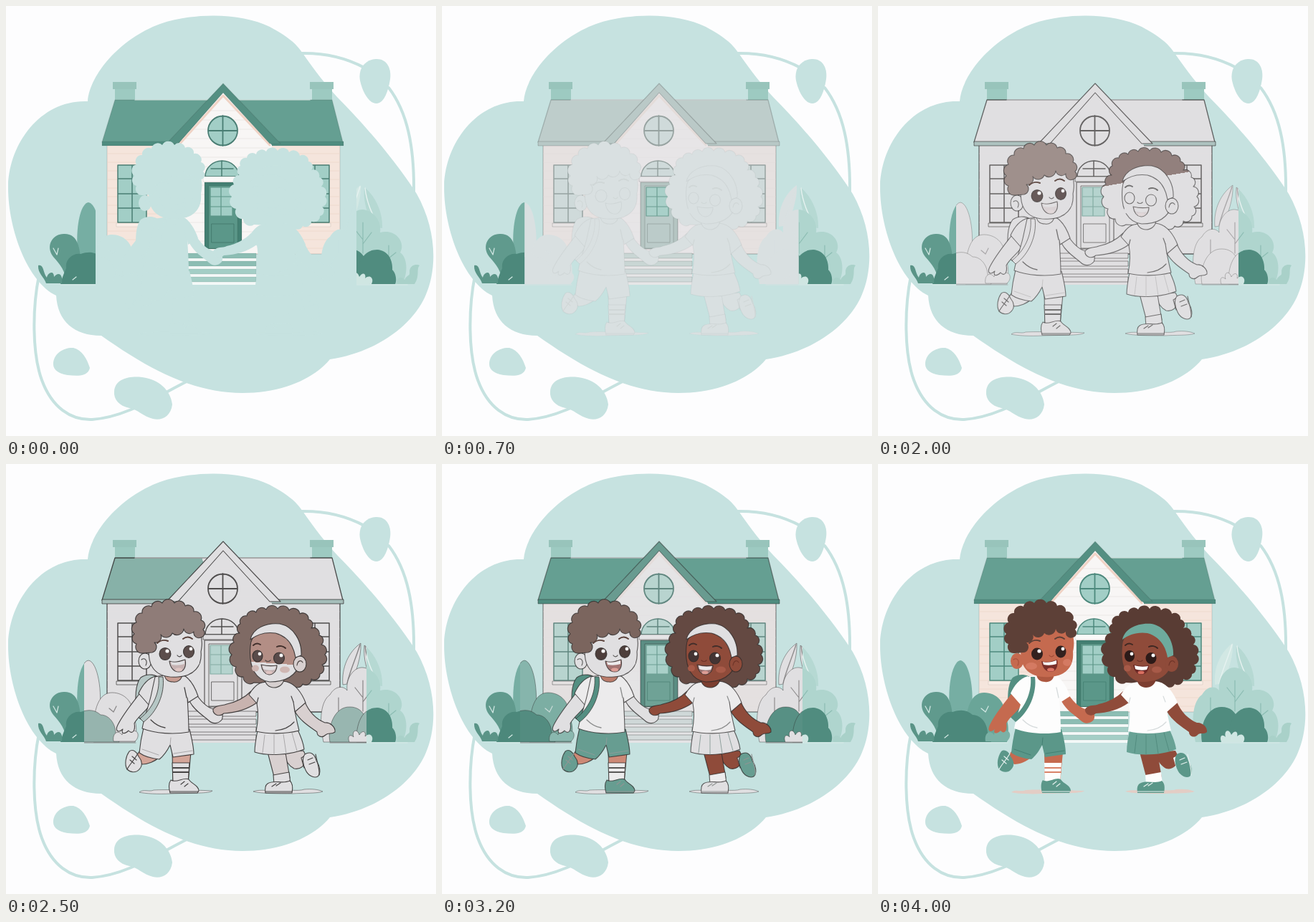
An HTML page for the animation above (7 s loop, 600x600 px).

```html
<!DOCTYPE html>
<html lang="en">
<head>
<meta charset="utf-8">
<title>Children in front of a house</title>
<style>
html, body { margin: 0; width: 100%; height: 100%; overflow: hidden; background: #fdfdfe; }
svg { display: block; width: 100vw; height: 100vh; }
</style>
</head>
<body>
<svg id="stage" viewBox="0 0 600 600"></svg>
<script>
const LOOP = 7000, STEP = 100, LAST = 4000;
const BLOB = '#c6e2e0', GREY = '#e0dfe1', INK = '#2b2928', WHITE = '#fdfdfd';
const TEAL = '#5b9789', DEEP = '#437f72', GLASS = '#a2cec6';
const stage = document.getElementById('stage');
const parts = [];

function el(tag, attrs, parent = stage) {
  const node = document.createElementNS('http://www.w3.org/2000/svg', tag);
  for (const key in attrs) node.setAttribute(key, attrs[key]);
  parent.appendChild(node);
  return node;
}

// keys: time, value, time, value ...
function at(t, keys) {
  if (t <= keys[0]) return keys[1];
  for (let i = 2; i < keys.length; i += 2) {
    if (t <= keys[i]) {
      const k = (t - keys[i - 2]) / (keys[i] - keys[i - 2]);
      return keys[i - 1] + (keys[i + 1] - keys[i - 1]) * k;
    }
  }
  return keys[keys.length - 1];
}

const rgb = hex => [1, 3, 5].map(i => parseInt(hex.slice(i, i + 2), 16));
const mix = (a, b, k) => a.map((v, i) => v + (b[i] - v) * k);
const css = c => `rgb(${c.map(Math.round)})`;

// Stages: wash to grey, ink lines, then colour (tone).
const WASH = [100, 0, 400, .45, 1000, 1];
const HOUSE_INK = [0, .12, 400, .15, 1200, .36, 2000, .68, 2500, .8, 3200, .5, 4000, .12];
const KID_INK = [600, 0, 1200, .3, 2000, .6, 2500, .85, 3200, .75, 3500, .5, 4000, 0];
const FOLD_INK = [1500, 0, 2500, .3, 3200, .3, 4000, 0];
const BUSH_INK = [1300, 0, 2000, .3, 2500, .5, 3200, .45, 4000, 0];
const NO_INK = [0, 0];
const house = (tone, more) => ({ own: true, wash: WASH, ink: HOUSE_INK, tone, ...more });
const kid = (tone, more) => ({ wash: WASH, ink: KID_INK, tone, ...more });
const bush = tone => ({ wash: WASH, ink: BUSH_INK, tone });

const K = {
  roof: house([2000, 0, 2500, .72, 3200, 1], { wipe: [2100, 0, 2500, .42, 2900, 1], dir: [134, 160, 470, 150] }),
  eave: house([1600, 0, 2000, .35, 2500, .4, 3200, 1]),
  gable: house([2600, 0, 3200, .85, 4000, 1]),
  wall: house([2700, 0, 3200, .2, 4000, 1]),
  plank: house([2700, 0, 3200, .25, 4000, 1], { ink: NO_INK }),
  pane: house([2600, 0, 3200, .65, 4000, 1]),
  doorGlass: house([2600, 0, 3200, .6, 4000, 1], { wash: [400, 0, 1200, .3], ink: NO_INK }),
  hairBoy: kid([1600, 0, 2000, .5, 2500, .62, 3200, .77, 4000, 1]),
  hairGirl: kid([1600, .4, 2000, .58, 2500, .72, 3200, .92, 4000, 1],
    { wipe: [1700, 0, 2000, .36, 2400, 1], dir: [376, 202, 394, 308] }),
  skinBoy: kid([3250, 0, 3800, 1]),
  legBoy: kid([2200, 0, 2500, .5, 4000, 1]),
  skinGirl: kid([2400, 0, 2500, .1, 3000, 1]),
  handGirl: kid([2300, 0, 2500, .3, 3000, 1]),
  faceGirl: kid([2300, 0, 2500, .55, 3000, 1], { wipe: [2300, 0, 2500, .65, 2800, 1], dir: [375, 230, 370, 304] }),
  eyeBoy: kid([1600, 0, 2000, .7, 3200, .85, 4000, 1]),
  eyeGirl: kid([2100, 0, 2500, .75, 4000, 1]),
  white: kid([2700, 0, 3200, .4, 4000, 1]),
  fold: kid([2700, 0, 3200, .3, 4000, 1], { ink: FOLD_INK }),
  tealEarly: kid([2500, 0, 3100, .9, 4000, 1]),
  pack: kid([2100, 0, 2500, .3, 3100, 1]),
  tealLate: kid([3250, 0, 3900, 1]),
  mouth: kid([1800, 0, 2500, .25, 3200, .6, 4000, 1]),
  bushDark: bush([2000, 0, 2500, .5, 3200, .95, 4000, 1]),
  bushLeaf: bush([2500, 0, 3200, .85, 4000, 1]),
  bushLight: bush([3250, 0, 4000, 1]),
};

function shape(parent, d, fill, kind, outline = 1.1) {
  const node = el('path', { d, fill, 'stroke-linejoin': 'round' }, parent);
  if (!kind) return;
  const part = { node, kind, fill: rgb(fill) };
  if (outline) {
    node.setAttribute('stroke', INK);
    node.setAttribute('stroke-width', outline);
    part.outlined = true;
  }
  if (kind.wipe) {
    const id = 'wipe' + parts.length, [x1, y1, x2, y2] = kind.dir;
    const grad = el('linearGradient', { id, x1, y1, x2, y2, gradientUnits: 'userSpaceOnUse' });
    part.stops = [el('stop', {}, grad), el('stop', {}, grad)];
    node.setAttribute('fill', `url(#${id})`);
  }
  parts.push(part);
}

function line(parent, d, color, width, kind) {
  const node = el('path', {
    d, fill: 'none', stroke: color, 'stroke-width': width,
    'stroke-linecap': 'round', 'stroke-linejoin': 'round'
  }, parent);
  if (kind) parts.push({ node, kind, line: rgb(color) });
}

const box = (x, y, w, h) => `M${x} ${y}h${w}v${h}h${-w}Z`;
const oval = (x, y, rx, ry = rx) =>
  `M${x - rx} ${y}a${rx} ${ry} 0 1 1 ${2 * rx} 0a${rx} ${ry} 0 1 1 ${-2 * rx} 0Z`;

// Curly outline: one arc between each pair of points.
function curls(text) {
  const pts = text.split(' ').map(p => p.split(',').map(Number));
  return pts.map(([x, y], i) => {
    if (!i) return `M${x} ${y}`;
    const r = Math.hypot(x - pts[i - 1][0], y - pts[i - 1][1]) * .56;
    return `A${r} ${r} 0 0 1 ${x} ${y}`;
  }).join('') + 'Z';
}

function drawBackdrop() {
  const g = el('g', {});
  shape(g, box(0, 0, 600, 600), '#fdfdfe');
  line(g, 'M410 66C445 65 474 72 500 86M534 114C560 148 570 196 569 262', BLOB, 4);
  line(g, 'M46 376C37 420 36 484 50 522C64 560 90 578 120 577C165 574 205 548 252 524', BLOB, 4);
  [
    'M114 133C117 95 160 45 215 25C265 8 330 10 368 29C392 42 405 52 414 66C432 92 445 108 462 127C500 165 545 218 573 262C600 310 603 365 585 405C565 450 510 485 452 493C430 520 385 540 330 540C255 540 190 500 133 460C95 460 72 440 70 404C30 385 2 310 3 250C5 190 50 130 114 133Z',
    'M516 74C532 73 538 88 536 102C533 122 526 136 517 136C507 136 498 122 494 104C491 86 502 75 516 74Z',
    'M66 498C67 484 82 476 94 477C106 480 113 492 117 505C114 518 98 516 86 515C74 513 65 508 66 498Z',
    'M151 538C152 520 172 516 190 518C214 521 230 537 232 556C230 573 217 579 205 576C192 573 184 563 172 561C158 558 150 549 151 538Z'
  ].forEach(d => shape(g, d, BLOB));
}

function drawHouse() {
  const g = el('g', {});
  for (const x of [149, 424]) {
    shape(g, box(x + 3, 115, 28, 17), '#9dcac1');
    shape(g, box(x, 106, 33, 10), '#98c4bb');
  }
  shape(g, box(141, 194, 325, 152), '#f5e5dc', K.wall, 1.3);
  let planks = '';
  for (let y = 206; y < 340; y += 12) planks += `M142 ${y}H238M372 ${y}H465`;
  line(g, planks, '#ecd6cb', .8, K.plank);
  shape(g, 'M152 131H455L470 190H134Z', '#659f92', K.roof, 1.3);
  line(g, 'M180 131H288M318 131H424', '#dcebe8', 1.2, K.plank);
  shape(g, box(134, 189, 337, 6), '#4f8c7f', K.eave, .9);
  shape(g, 'M303 120L371 194V345H239V194Z', '#f8f6f5', K.wall, 0);
  planks = '';
  for (let y = 146; y < 340; y += 13) {
    const half = Math.min(63, (y - 124) * .92);
    planks += `M${303 - half} ${y}H${303 + half}`;
  }
  line(g, planks, '#e8e4e2', .8, K.plank);
  line(g, 'M241 194L303 125L368 194', '#f0d3c5', 3, K.plank);
  shape(g, 'M303 108L383 192H368L303 121L240 192H224Z', '#548f82', K.gable);

  const pane = (d, bars, w = 1.5) => {
    shape(g, d, GLASS, K.pane, 0);
    line(g, d + bars, '#4d897d', w, K.pane);
  };
  for (const x of [156, 411]) {
    pane(box(x, 222, 40, 80), `M${x + 20} 222v80M${x} 241h40M${x} 262h40M${x} 282h40`);
    shape(g, box(x - 2, 303, 44, 5), '#faeee7', K.wall, .8);
  }
  pane(oval(302.5, 174, 20.5), 'M302.5 153V195M282 174H323', 1.8);
  pane('M278 238A23.5 22 0 0 1 325 238Z', 'M301 216V238M286 227H317');
  shape(g, box(275, 238, 54, 7), '#fbfaf9', K.wall, .8);
  shape(g, box(277, 246, 52, 93), DEEP, K.gable);
  shape(g, box(283, 251, 40, 87), TEAL, K.gable, .8);
  shape(g, box(285, 253, 31, 40), GLASS, K.doorGlass, 0);
  line(g, box(285, 253, 31, 40) + 'M300 253V293M285 266H316M285 280H316', '#5d9688', 1.2, K.doorGlass);
  line(g, box(287, 304, 31, 26), DEEP, .8, K.gable);
  shape(g, box(253, 344, 96, 45), '#f4f9f8', K.wall, 0);
  for (let i = 0; i < 4; i++) shape(g, box(253, 345 + i * 11, 96, 7), i < 2 ? '#8cbdb3' : '#a4cec6', K.wall, .7);
}

function drawBushes(parent, live) {
  const g = el('g', {}, parent);
  const put = (d, fill, kind) => shape(g, d, fill, live && K[kind], .9);
  const vein = (d, color, kind) => line(g, d, color, 1.2, live && K[kind]);
  put('M101 350C96 318 102 276 115 274C128 276 135 318 130 350Z', '#76aea3', 'bushLeaf');
  put('M104 388H84C84 370 75 360 66 350C54 334 66 317 82 318C100 318 107 336 104 388Z', '#609a8d', 'bushDark');
  put('M122 388C120 336 132 319 148 319C166 319 179 334 176 350C184 360 182 378 180 388Z', '#6aa598', 'bushLeaf');
  put('M76 388C78 380 82 370 84 366C82 352 95 344 104 346C116 342 124 343 132 350C146 350 154 366 153 378L158 388Z', '#4c887b', 'bushDark');
  put('M45 362C53 360 51 371 57 379C58 372 67 368 67 378C73 370 80 374 78 387H56C53 378 44 373 45 362Z', '#5a9487', 'bushDark');
  put('M150 387C148 376 156 370 162 378C164 366 172 364 174 374C184 368 188 380 180 387Z', '#7bb1a6', 'bushLeaf');
  vein('M66 338L71 347L73 338M150 346L154 338M150 346L144 341M93 382L98 378', '#d4e9e5', 'bushLeaf');

  put('M495 250C478 262 468 284 470 308L482 306C488 290 496 270 495 250Z', '#d2e8e4', 'bushLight');
  put('M500 253C514 264 526 286 525 310L512 308C504 290 498 272 500 253Z', '#b6d9d3', 'bushLight');
  line(g, 'M494 252C488 272 480 288 476 306M501 254C503 274 511 290 518 304', '#e6f2f0', 1.4, live && K.bushLight);
  put('M443 388C436 356 440 330 452 322C460 308 472 310 476 316C474 298 486 283 498 284C514 286 524 300 522 316C544 310 558 330 550 344C562 352 560 378 552 388Z', '#afd5ce', 'bushLight');
  vein('M498 345V302M498 326L487 312M498 332L510 316M534 368V334M534 352L544 344M534 357L525 347M464 345V326', '#8bbcb2', 'bushLight');
  put('M452 388C448 368 458 338 480 339C498 339 508 356 506 388Z', '#508c7f', 'bushDark');
  put('M489 388C488 364 496 340 518 340C534 341 540 356 539 368C545 374 545 384 543 388Z', '#508c7f', 'bushDark');
  put('M546 388C544 378 552 376 556 382C560 374 564 378 563 370C564 360 574 360 577 362C572 368 578 376 570 388Z', '#a9d1c9', 'bushLight');
  put('M479 388C476 380 480 376 485 381C482 372 490 368 493 378C498 370 503 374 501 380C508 374 514 380 510 388Z', '#cfe6e2', 'bushLight');
  line(g, 'M76 389H181M452 389H560', '#d8ebe8', .9, live && K.bushLight);
}

function drawBoy() {
  const g = el('g', {});
  const put = (d, fill, kind, w) => shape(g, d, fill, K[kind], w);
  const ink = (d, color, w, kind) => line(g, d, color, w, K[kind]);
  const skin = '#c56a4f', hair = '#5d4037';
  put('M186 458C192 453 200 458 206 455C222 454 270 455 288 456C284 460 260 459 230 460C212 461 194 460 186 458Z', '#e3cdc5', 'tealLate', .5);
  put('M188 298C198 291 210 294 216 300L205 352C198 360 188 360 183 350C180 330 180 308 188 298Z', '#548f82', 'pack');
  put('M187 400L214 409C208 415 198 419 190 419L181 408Z', skin, 'legBoy');
  put('M172 401C177 397 183 402 185 408C190 414 191 421 186 426C181 432 173 430 169 426C165 419 167 408 172 401Z', TEAL, 'tealEarly');
  ink('M184 404C178 414 172 420 169 426M176 408L182 413M173 413L179 418', '#e6f1ef', 1.2, 'white');
  put('M232 402H258L254 446H233Z', skin, 'legBoy');
  put('M232 417H256L254 446H233Z', WHITE, 'white');
  ink('M233 424H255M233 430H255', '#d98268', 1.8, 'skinBoy');
  put('M230 441C238 446 248 436 255 440C258 446 269 448 269 456L267 459H229C227 452 227 445 230 441Z', TEAL, 'tealEarly');
  ink('M229 457H268M244 447L249 443M249 450L254 446', '#e6f1ef', 1.2, 'white');
  put('M192 368L256 370C259 382 262 394 262 405L233 409L229 392C224 402 219 408 214 412C204 411 193 408 186 403C187 392 189 380 192 368Z', TEAL, 'tealEarly');
  ink('M229 392L230 382M190 398L213 406M234 404L260 400', DEEP, 1, 'fold');
  put('M189 317L202 334C196 345 184 352 179 362C181 372 176 378 171 372C165 378 160 376 163 370C156 376 152 372 156 364C164 348 176 334 189 317Z', skin, 'skinBoy');
  put('M256 331L266 322C274 334 284 342 294 343C301 343 304 351 301 357C296 363 288 363 283 358C274 350 263 344 256 331Z', skin, 'skinBoy');
  put('M209 296C198 299 190 309 185 320L200 337L214 322Z', WHITE, 'white');
  put('M208 297C220 294 240 293 250 296C257 301 264 312 268 324L254 333L253 326C254 342 255 358 255 374C234 378 208 376 190 369C193 352 201 332 203 320Z', WHITE, 'white');
  ink('M202 357C208 363 215 367 222 368M252 326L249 312', '#d6dbdc', 1.3, 'white');
  put('M213 297L219 297C222 320 211 346 192 360L187 355C204 342 215 320 213 297Z', '#548f82', 'pack', .9);
  put('M221 292H246C246 302 238 305 233 304C226 304 221 300 221 292Z', '#ad5840', 'legBoy');
  put(oval(194, 275, 9, 11), skin, 'skinBoy');
  ink('M189 273C194 269 198 275 195 281', '#a64f3a', 1.1, 'skinBoy');
  put('M201 238C198 262 198 276 206 286C214 296 228 298 240 297C262 296 274 282 272 262C275 248 273 236 266 226H212Z', skin, 'skinBoy');
  put(curls('191,264 182,251 179,237 182,221 190,208 203,199 218,194 235,194 250,198 262,206 272,218 275,231 272,242 262,234 248,230 232,236 216,238 207,249 204,263'), hair, 'hairBoy');
  put(oval(214, 282, 8, 5), '#d47a62', 'skinBoy', 0);
  put(oval(264, 277, 6, 5), '#d47a62', 'skinBoy', 0);
  put(oval(222, 265, 8, 8.5), '#33211e', 'eyeBoy');
  put(oval(255, 262, 7.5, 8.5), '#33211e', 'eyeBoy');
  put(oval(225, 261, 2.6), WHITE, 'eyeBoy', 0);
  put(oval(258, 258, 2.4), WHITE, 'eyeBoy', 0);
  ink('M211 250C215 246 221 245 226 247M247 244C251 241 256 241 260 244', hair, 2, 'eyeBoy');
  ink('M239 267C241 270 244 269 245 267', '#a04c38', 1.2, 'skinBoy');
  put('M228 275C236 278 243 275 250 273C252 283 248 290 241 290C234 290 229 284 228 275Z', '#7a2f2a', 'mouth');
  put('M230 276C237 278 243 276 249 274L249 279C243 281 236 281 231 280Z', WHITE, 'white', 0);
  put(oval(241, 287, 5, 2.6), '#dc7565', 'mouth', 0);
}

function drawGirl() {
  const g = el('g', {});
  const put = (d, fill, kind, w) => shape(g, d, fill, K[kind], w);
  const ink = (d, color, w, kind) => line(g, d, color, w, K[kind]);
  const skin = '#8f4b3a', hair = '#593c34';
  put('M345 457C352 454 362 456 372 455C392 454 408 457 416 454C426 453 436 454 442 457C434 460 414 459 400 460C380 460 356 460 345 457Z', '#e3cdc5', 'tealLate', .5);
  put(curls('346,305 331,297 321,283 315,266 318,249 326,236 327,223 336,212 349,207 363,203 379,202 395,204 410,209 422,217 426,229 437,239 440,252 445,266 441,280 438,293 426,300 414,307 400,308'), hair, 'hairGirl');
  put('M387 402L415 400L421 412C416 422 410 427 402 425C396 422 390 416 387 402Z', skin, 'skinGirl');
  put('M412 410L421 405L426 418L416 424Z', WHITE, 'white');
  put('M417 405C425 400 431 405 433 414C438 421 440 431 435 436C429 439 421 434 418 427C414 419 413 410 417 405Z', TEAL, 'tealEarly');
  ink('M432 405C434 416 438 426 437 434M421 413L428 410M423 419L431 416', '#e6f1ef', 1.2, 'white');
  put('M365 402L390 403L396 438L375 440Z', skin, 'skinGirl');
  put('M373 434L395 430L397 446L374 447Z', WHITE, 'white');
  put('M365 446C374 440 386 447 396 442C401 446 400 454 399 459H362C361 452 362 448 365 446Z', TEAL, 'tealLate');
  ink('M362 457H399M377 449L383 445M371 450L377 446', '#e6f1ef', 1.2, 'white');
  put('M351 372L406 369C411 379 415 390 416 398C398 406 365 408 347 402C347 392 349 382 351 372Z', '#68a295', 'tealLate');
  ink('M361 378L358 403M374 378V405M387 377L391 404M399 375L406 400', '#528c7f', 1, 'fold');
  put('M342 317L350 333C336 343 320 347 304 348C297 354 288 349 289 342C294 335 302 338 308 335C322 332 333 326 342 317Z', skin, 'handGirl');
  put('M403 345L417 332C423 346 433 356 445 361C452 360 460 367 459 374C454 378 450 374 446 378C441 383 434 380 434 374C423 366 410 358 403 345Z', skin, 'skinGirl');
  put('M354 306C362 303 384 302 392 304C404 307 413 320 418 333L403 346L401 332C403 346 406 360 409 372C390 377 366 377 349 373C352 358 352 344 350 334L339 322C343 315 348 309 354 306Z', WHITE, 'white');
  ink('M401 332L398 324M376 372C387 371 396 367 402 360M350 334L352 326', '#d6dbdc', 1.2, 'white');
  put('M361 298H388C388 308 380 312 374 312C367 312 361 307 361 298Z', '#7c3e30', 'skinGirl');
  put('M341 254C342 238 354 230 378 232C403 236 412 258 410 278C404 298 388 304 368 304C350 302 338 286 341 254Z', skin, 'faceGirl');
  put(oval(410, 279, 9, 11), skin, 'skinGirl');
  ink('M406 281C407 274 412 273 414 277', '#6f3529', 1.1, 'skinGirl');
  put('M341 245C344 230 362 221 382 223C402 227 413 248 412 267L404 270C401 252 391 240 376 236C362 234 350 238 341 245Z', '#6eaa9d', 'tealLate');
  put(oval(348, 285, 5, 4.5), '#a75a48', 'handGirl', 0);
  put(oval(389, 287, 7, 4.5), '#a75a48', 'handGirl', 0);
  put(oval(351, 268, 7, 8), '#2c1a18', 'eyeGirl');
  put(oval(381, 271, 7.5, 8), '#2c1a18', 'eyeGirl');
  put(oval(354, 265, 2.4), WHITE, 'eyeGirl', 0);
  put(oval(384, 267, 2.5), WHITE, 'eyeGirl', 0);
  ink('M345 253C348 250 352 250 355 252M378 255C382 253 387 254 390 257', '#3f2823', 1.9, 'eyeGirl');
  ink('M362 274C364 276 367 276 369 274', '#6d3328', 1.2, 'skinGirl');
  put('M356 280C364 282 371 282 378 281C378 289 373 294 367 294C360 293 357 287 356 280Z', '#6d2926', 'mouth');
  put('M358 281C364 283 371 283 377 282L375 287C370 288 363 288 359 286Z', WHITE, 'white', 0);
  put(oval(367, 291, 4.5, 2.3), '#d96f60', 'mouth', 0);
}

drawBackdrop();
drawHouse();
const clip = id => el('clipPath', { id });
const outer = clip('outer'), inner = clip('inner');
const leftSide = el('rect', { x: 0, y: 0, width: 125, height: 600 }, outer);
const rightSide = el('rect', { x: 489, y: 0, width: 111, height: 600 }, outer);
const middle = el('rect', { x: 125, y: 0, width: 364, height: 600 }, inner);
drawBushes(el('g', { 'clip-path': 'url(#outer)' }), false);
drawBushes(el('g', { 'clip-path': 'url(#inner)' }), true);
drawBoy();
drawGirl();

const blob = rgb(BLOB), grey = rgb(GREY), black = rgb(INK);

function update(time) {
  const t = Math.min(LAST, Math.floor(time / STEP) * STEP);
  for (const p of parts) {
    const k = p.kind, final = p.line || p.fill;
    const base = mix(k.own ? final : blob, grey, at(t, k.wash));
    const ink = at(t, k.ink), tone = at(t, k.tone);
    if (p.line) {
      p.node.setAttribute('stroke', css(mix(mix(base, black, ink), final, tone)));
      continue;
    }
    const done = mix(base, final, tone);
    if (p.stops) {
      const edge = at(t, k.wipe);
      const colors = [edge > 0 ? done : base, edge < 1 ? base : done];
      p.stops.forEach((s, i) => {
        s.setAttribute('offset', edge);
        s.setAttribute('stop-color', css(colors[i]));
      });
    } else {
      p.node.setAttribute('fill', css(done));
    }
    if (p.outlined) p.node.setAttribute('stroke-opacity', ink);
  }
  const grow = at(t, [400, 0, 900, 1]);
  const left = 125 - 16 * grow, right = 489 + 14 * grow;
  leftSide.setAttribute('width', left);
  rightSide.setAttribute('x', right);
  middle.setAttribute('x', left);
  middle.setAttribute('width', right - left);
}

const begin = performance.now();
function tick() {
  update((performance.now() - begin) % LOOP);
  requestAnimationFrame(tick);
}
tick();
</script>
</body>
</html>
```
